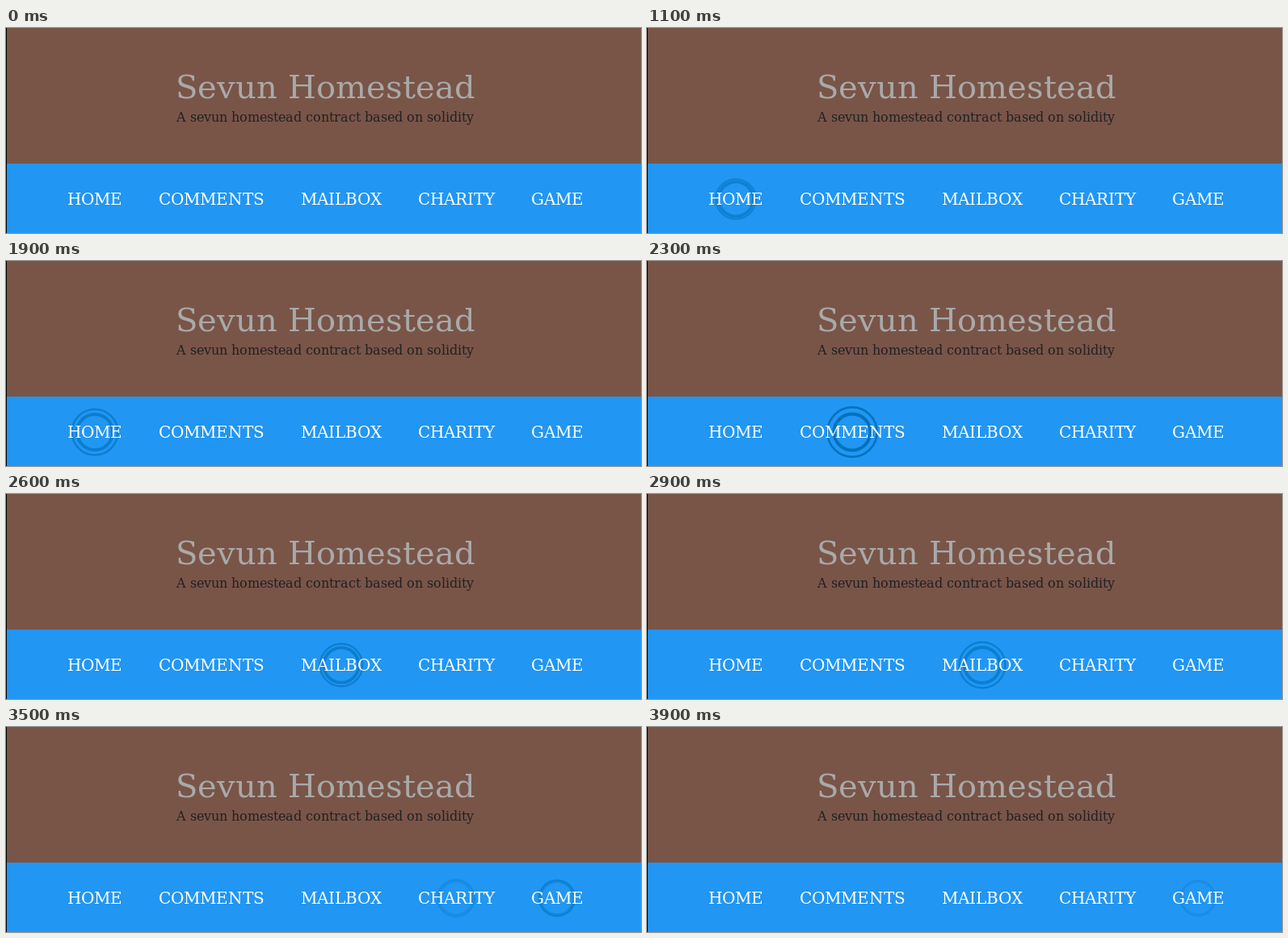
Recreate the animation shown at these times as an HTML page with a canvas. Size 786 by 254 pixels, loop 4700 ms.

```html
<!DOCTYPE html>
<html lang="en">
<head>
<meta charset="utf-8">
<title>Community menu</title>
<style>
  html, body { margin: 0; width: 100%; height: 100%; overflow: hidden; background: #795548; }
  canvas { display: block; }
</style>
</head>
<body>
<canvas id="stage" width="786" height="254"></canvas>
<script>
const LOOP = 4700, STEP = 100, LAST_CHANGE = 3900;
const EASE_TIME = 70;
const ROW_Y = 212, HEADER_X = 395;

// on / off: moments the pointer enters and leaves each link
const links = [
  { label: "HOME", x: 110, on: 1000, off: 1893 },
  { label: "COMMENTS", x: 254, on: 1888, off: 2480 },
  { label: "MAILBOX", x: 415, on: 2480, off: 2893 },
  { label: "CHARITY", x: 557, on: 2930, off: 3474 },
  { label: "GAME", x: 682, on: 3425, off: 3868 }
];

const ctx = document.getElementById("stage").getContext("2d");

// Centred text whose glyphs advance by whole pixels, as hinted fonts do.
function text(string, centerX, baseline, size, color) {
  ctx.font = size + 'px "DejaVu Serif", serif';
  ctx.fillStyle = color;
  const advances = [...string].map(ch => Math.round(ctx.measureText(ch).width));
  const width = advances.reduce((sum, w) => sum + w, 0);
  let x = Math.round(centerX - width / 2);
  advances.forEach((advance, i) => {
    ctx.fillText(string[i], x, baseline);
    x += advance;
  });
}

function rect(x, y, w, h, color) {
  ctx.fillStyle = color;
  ctx.fillRect(x, y, w, h);
}

function ring(x, radius, width, scale) {
  ctx.lineWidth = width * scale;
  ctx.beginPath();
  ctx.arc(x, ROW_Y, radius * scale, 0, Math.PI * 2);
  ctx.stroke();
}

const decay = ms => Math.exp(-Math.max(0, ms) / EASE_TIME);

function ripple({ x, on, off }, t) {
  const fade = decay(t - off);
  const p = (1 - decay(Math.min(t, off) - on)) * fade;
  if (p < 0.06) return;
  ctx.globalAlpha = (p * fade) ** 2;
  ring(x, 30.75, 2.5, 0.2 + 0.8 * p);
  ring(x, 22.5, 4, 0.8 + 0.2 * p);
  ctx.globalAlpha = 1;
}

function draw(time) {
  const t = Math.min(Math.floor(time / STEP) * STEP, LAST_CHANGE);

  rect(0, 0, 786, 168, "#795548");
  rect(0, 168, 786, 86, "#2196f3");
  rect(0, 0, 1, 254, "#000");

  text("Sevun Homestead", HEADER_X, 87, 40, "#a9a9a9");
  text("A sevun homestead contract based on solidity", HEADER_X, 116, 16, "#212121");

  ctx.strokeStyle = "rgb(2, 114, 188)";
  for (const link of links) {
    ripple(link, t);
    text(link.label, link.x, 219, 20, "#fff");
  }
}

const start = performance.now();
function frame() {
  draw((performance.now() - start) % LOOP);
  requestAnimationFrame(frame);
}
frame();
</script>
</body>
</html>
```
